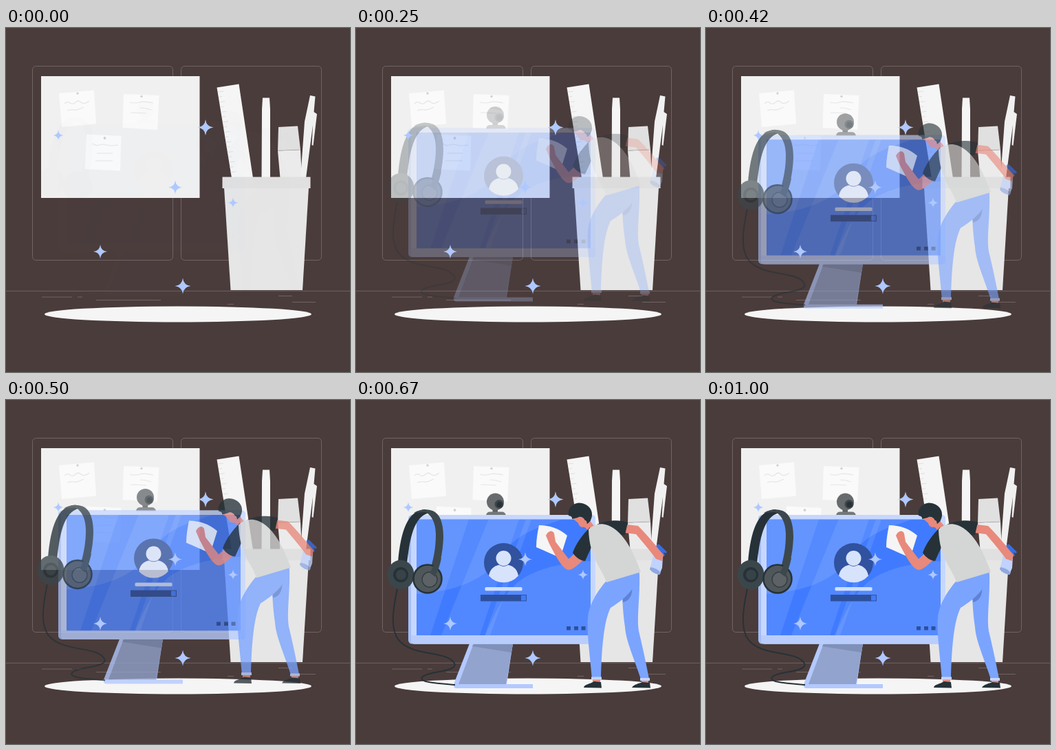
Recreate the animation shown at these times as an HTML page. Size 500x500 px, loop 1.04 s.

```html
<!DOCTYPE html>
<html lang="en">
<head>
<meta charset="utf-8">
<title>Desk cleaning</title>
<style>
  html, body { margin: 0; width: 100%; height: 100%; overflow: hidden; background: #4a3c3b; }
  svg { display: block; width: 100%; height: 100%; }
</style>
</head>
<body>
<svg viewBox="0 0 500 500">
  <defs>
    <path id="star" d="M0-1Q.1-.1 1 0Q.1.1 0 1Q-.1.1-1 0Q-.1-.1 0-1Z"/>
    <clipPath id="screen"><path d="M88 173.500H341V342H88Z"/></clipPath>
  </defs>

  <!-- room -->
  <g fill="none" stroke="#7a6e6d" stroke-width=".8">
    <rect x="38.500" y="55.500" width="204" height="282" rx="5"/>
    <rect x="254.500" y="55.500" width="204" height="282" rx="5"/>
    <path d="M0 382.300H500M52 391H96M104 391H111M131 395.500H225M322 401.500H331M396 389.500H416M416 398.500H450"/>
  </g>

  <!-- board -->
  <path fill="#f0f0f0" d="M51 70H281.500V247H51Z"/>
  <path fill="#fafafa" d="M77 95L128 90.500L131 139.500L81 144ZM171 96L222.500 98L220 148L169.500 145ZM117 154.500L167.500 157L166 207.500L114.500 205Z"/>
  <g fill="none" stroke="#e6e6e6" stroke-width="1.200">
    <path d="M85 110q4-4 8-1t8-1t8 0t12-2M89 120q6-2 10-1t14-4M180 108q8 2 14 0t20 1M195 116q8 0 16 3M181 123q12 0 23 1M126 168q5 4 10 2t10 0t17 0M132 182H155M130 193H155"/>
  </g>
  <g fill="#d2d2d2">
    <circle cx="104" cy="95" r="1.700"/><circle cx="197" cy="99.500" r="1.700"/><circle cx="143.500" cy="160" r="1.900"/>
  </g>

  <!-- pen cup -->
  <path fill="#f5f5f5" d="M306.500 86.500L338.500 81.500L359 218H328ZM373 101.500H383L384 118V218H371.500L372 118Z"/>
  <path id="ticks" fill="none" stroke="#e0e0e0"/>
  <path fill="#e0e0e0" d="M396 144L424 142.500L428 177L395 178.500Z"/>
  <path fill="#ebebeb" d="M395 178.500L428 177L430 218H398.500Z"/>
  <path fill="none" stroke="#a5a0a0" stroke-width=".6" d="M395 178L428 177"/>
  <path fill="#f0f0f0" d="M442 98L449.500 99.500L447.500 122L452 125L446.500 171L444.500 170L446 141L436 218H428L434 136Z"/>
  <path fill="#e6e6e6" d="M317 232H440L431 381H326.500Z"/>
  <path fill="#e0e0e0" d="M314.500 216.500H442.500V233H314.500Z"/>

  <ellipse cx="250" cy="416" rx="194" ry="11.500" fill="#f5f5f5"/>

  <!-- webcam -->
  <g class="drop">
    <path fill="#5a6064" d="M198.500 157H206V165H198.500Z"/>
    <path fill="#74777a" d="M189 168Q189.500 162.500 195 162.500H212Q217 162.500 218 168Z"/>
    <circle cx="202.500" cy="148" r="12.500" fill="#686b6e"/>
    <circle cx="208" cy="151.500" r="6.500" fill="#3d464b"/>
    <circle cx="208.500" cy="152" r="4" fill="#263238"/>
  </g>

  <!-- monitor -->
  <g class="drop">
    <path fill="#b3c9ff" d="M165 354H228L219 413H257V419H145Q141 418 142 413Z"/>
    <path fill="#92a3cd" d="M171 354H228L218 413H149Z"/>
    <path fill="#7f90b9" d="M171 354H228L226 367L169 358Z"/>
    <rect x="76" y="167" width="272" height="187.500" rx="5.500" fill="#a4bdf5"/>
    <rect x="80" y="167" width="268" height="187.500" rx="5" fill="#c6d7ff"/>
    <path fill="#b9cdfd" d="M80 342H348V350Q348 354.500 343 354.500H85Q80 354.500 80 349Z"/>
    <g clip-path="url(#screen)">
      <path fill="#407bff" d="M88 173H341V342H88Z"/>
      <g fill="#fff">
        <path opacity=".11" d="M88 173H300C270 185 235 190 210 228C185 265 140 278 88 282ZM188 342C200 312 213 285 235 265C265 242 305 237 341 234V342Z"/>
        <path opacity=".09" d="M88 173H164L108 342H88ZM193 173H237L180 342H124ZM247 173H255L195 342H187Z"/>
      </g>
    </g>
    <circle cx="214.500" cy="236.500" r="28.500" fill="#30529f"/>
    <path fill="#d7e2fb" d="M193 255.500C195 244 203 239 214.500 239S234 244 236 255.500A28.500 28.500 0 0 1 193 255.500Z"/>
    <circle cx="214.500" cy="230" r="11.800" fill="#30529f"/>
    <circle cx="214.500" cy="230" r="11" fill="#d7e2fb"/>
    <rect x="187.500" y="272" width="54" height="5.200" rx="1.500" fill="#cfdfff"/>
    <path fill="#2d509d" d="M181 283H248V292.500H181ZM306 329H312V334.500H306ZM317 329H323V334.500H317ZM327.500 329H333.500V334.500H327.500Z"/>
    <path fill="#407bff" d="M240 284H247V291.500H240Z"/>
  </g>

  <!-- headphones -->
  <g class="drop">
    <path fill="none" stroke="#263238" stroke-width="2" d="M60 274C53 308 50 334 62 349C80 371 122 365 139 378C152 389 135 393 115 396C95 400 90 405 101 409C115 412 130 413 144 414"/>
    <path fill="#263238" d="M61 236C65 190 75 160 101 159L106 164C84 170 78 200 74 240Z"/>
    <ellipse cx="65" cy="254" rx="19.500" ry="21.500" fill="#3b464b"/>
    <circle cx="65" cy="254" r="11" fill="#263238"/>
    <circle cx="65.500" cy="254" r="7.500" fill="#374348"/>
    <path fill="#3d484d" d="M84 164C95 158 107 158 115 163C125 170 127 186 127 200C126 225 121 243 115 257L107 250C113 230 116 215 116 195C116 180 110 166 100 163Z"/>
    <circle cx="104" cy="260" r="20.500" fill="#50575b" stroke="#263238" stroke-width="2.500"/>
    <circle cx="107" cy="261" r="11" fill="#5c6265" stroke="#323c41" stroke-width="1.300"/>
    <path fill="#3d484d" d="M117 228L124 230Q121 245 115 257L107 251Q113 242 117 228Z"/>
  </g>

  <!-- cleaner -->
  <g class="drop">
    <path fill="#f5f5f5" d="M266 182C281 182 296 187 307 197L297 229C286 225 275 219 262 214C262 202 264 192 266 182Z"/>
    <path fill="#e8897b" d="M344 399V411H355V399ZM415 401V412H425V401Z"/>
    <path fill="#7ba4ff" d="M387 276L412 252C413 290 407 320 412 340C418 365 422 385 426 405L414 406C406 380 392 350 391 330C388 310 387 290 387 276Z"/>
    <path fill="#5f82d6" d="M400 263C404 280 399 292 388 294L386 277Z"/>
    <path fill="#7ba4ff" d="M363 264L412 250C410 267 397 286 370 302C360 322 357 362 356 405H343C340 370 335 335 337 317C338 299 350 279 363 264Z"/>
    <path fill="#c6d6ff" d="M342 402.500H357V406.500H342ZM413 404H427V408H413Z"/>
    <path fill="#263238" d="M331 418C332 413 340 413 346 409L356 410L357 418.500ZM401 418C404 413 412 412 416 410L427 411L428 418.500Z"/>
    <path fill="#c0d2fd" d="M433 222L446 228L445 244L441 254Q431 252 427 246Z"/>
    <path fill="#8fa9df" d="M428 243Q437 244 443 251L441 254Q431 252 427 246Z"/>
    <path fill="#386ee2" d="M437 210L441 210L452 221L450 223L447 221L449 226L444 229L435 219Z"/>
    <path fill="#e8897b" d="M394 181L410 183C422 195 434 209 440 217L447 225L445 234L436 231C430 222 416 206 407 195L390 193Z"/>
    <path fill="#e8897b" d="M316 168L337 172L347 184L337 191Q333 183 329 185Q324 184 323 179L316 173Z"/>
    <path fill="#263238" d="M309 168C307 157 316 150 324 149.500C336 150 344 158 343 168C342 175 339 178 336 180L331 172Q326 168 322 171L314 173Q315 169 309 168Z"/>
    <ellipse cx="333" cy="179" rx="2.500" ry="4" fill="#e8897b"/>
    <path fill="#e8897b" d="M276 197C280 189 286 189 288 194L290 206L309 231L319 222L330 233C322 240 316 246 309 247C302 246 296 236 290 226L281 209Z"/>
    <path fill="#263238" d="M340 185C330 195 320 208 315 222C320 230 328 234 333 234L343 212ZM350 181C365 174 385 174 395 178L391 196C385 198 378 192 372 188Z"/>
    <path fill="#d4d5d5" d="M338 188C345 181 355 178 366 182C390 191 405 225 414 250L364 265C358 245 339 230 338 188Z"/>
  </g>

  <g id="stars"></g>
</svg>
<script>
  const find = id => document.getElementById(id);

  find("ticks").setAttribute("d", Array.from({ length: 17 }, (_, i) =>
    `M${308 + i * 1.15} ${93 + i * 7.3}l${i % 2 ? 5 : 8}-1`).join(""));

  const stars = [[290, 144.5, 11.5], [76, 156, 7.5], [246, 231.5, 10],
                 [330, 254, 7.5], [137, 325, 10], [257, 375, 11.5]];
  find("stars").innerHTML = stars.map(([x, y, r]) =>
    `<use href="#star" fill="#afc8ff" transform="translate(${x} ${y}) scale(${r})"/>`).join("");

  const bezier = (a, b, s) => 3 * (1 - s) ** 2 * s * a + 3 * (1 - s) * s * s * b + s ** 3;

  // Overshooting ease: bisect for the curve parameter at time u
  function ease(u) {
    let lo = 0, hi = 1;
    for (let i = 0; i < 24; i++) {
      const mid = (lo + hi) / 2;
      if (bezier(0.36, 0.5, mid) < u) lo = mid; else hi = mid;
    }
    return bezier(-0.01, 1.38, hi);
  }

  const LOOP = 1040, STEPS = 25;
  const drops = document.querySelectorAll(".drop");
  const start = performance.now();

  function draw() {
    const t = Math.max(0, performance.now() - start) % LOOP;
    const p = ease((Math.floor(t / LOOP * STEPS) + 1) / STEPS);
    for (const el of drops) {
      el.setAttribute("transform", `translate(0 ${30 * (p - 1)})`);
      el.setAttribute("opacity", Math.min(1, Math.max(0, p)));
    }
    requestAnimationFrame(draw);
  }
  draw();
</script>
</body>
</html>
```
